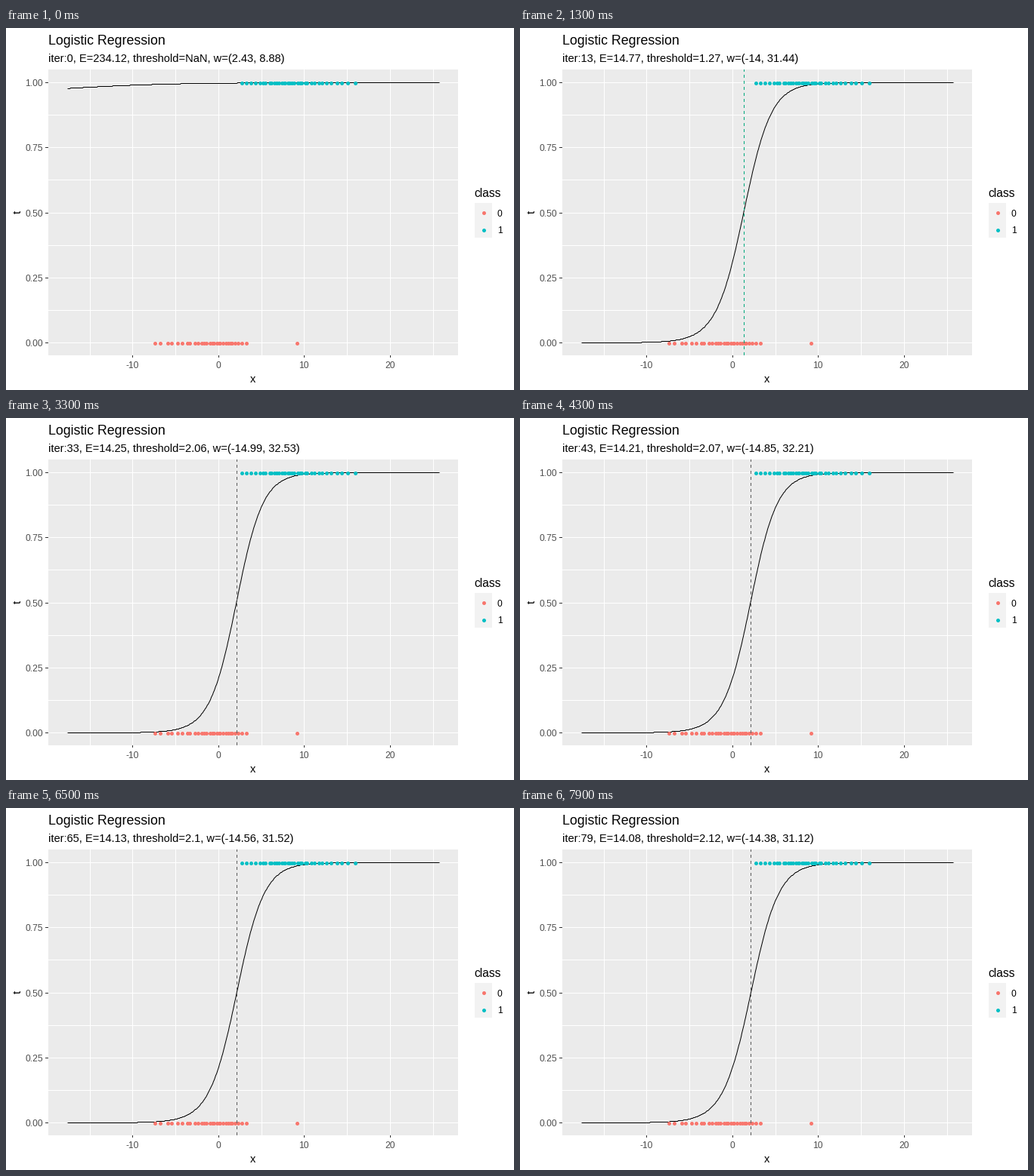
These frames come from a looping animation (672 px wide and 480 px high, 8000 ms). A matplotlib script:

```python
import numpy as np
import matplotlib.pyplot as plt
from matplotlib.animation import FuncAnimation
from matplotlib.patches import Rectangle

W, H, DPI = 672, 480, 100
FRAMES, INTERVAL = 80, 100
PX = 72 / DPI                      # points per pixel
LEFT, RIGHT, TOP, BOTTOM = 56, 598, 55, 434
MU, SCALE = 4.027, 12.57           # sigmoid basis
RED, TEAL, GREEN, GRAY = "#F8766D", "#00BFC4", "#00A87B", "#595959"

plt.rcParams["font.family"] = "Liberation Sans"
fig = plt.figure(figsize=(W / DPI, H / DPI), dpi=DPI, facecolor="white")
ax = fig.add_axes([0, 0, 1, 1])
ax.set_xlim(0, W)
ax.set_ylim(H, 0)
ax.axis("off")


def px_x(x):
    return 281.4 + 11.35 * x


def px_y(t):
    return 417.5 - 345 * t


def center(v):
    """Middle of the pixel that holds v."""
    return np.floor(v) + 0.5


def sigmoid(a):
    return 1 / (1 + np.exp(-a))


def rect(x, y, w, h, color):
    ax.add_patch(Rectangle((x, y), w, h, fc=color, lw=0))


def stroke(xs, ys, color, z, **kw):
    return ax.plot(xs, ys, color=color, lw=PX, zorder=z, snap=False,
                   solid_capstyle="butt", dash_capstyle="butt", **kw)[0]


def label(x, y, s, size, color="black", **kw):
    kw.setdefault("va", "baseline")
    return ax.text(x, y, s, fontsize=size * PX, color=color, zorder=6, **kw)


def dots(xs, y, color):
    ax.scatter(xs, np.full(len(xs), y), s=(5 * PX) ** 2, color=color,
               lw=0, zorder=4)


# Panel, grid, axes
rect(LEFT, TOP, RIGHT - LEFT, BOTTOM - TOP, "#EBEBEB")
for v in range(-15, 26, 5):
    x = center(px_x(v))
    stroke([x, x], [TOP, BOTTOM], "white", 2)
    if v % 10 == 0:
        stroke([x, x], [BOTTOM, BOTTOM + 3], "#333333", 2)
        label(x - 0.5, 451, str(v), 12, "#4D4D4D", ha="center")
for k in range(9):
    y = center(px_y(k / 8))
    stroke([LEFT, RIGHT], [y, y], "white", 2)
    if k % 2 == 0:
        stroke([LEFT - 4, LEFT], [y, y], "#333333", 2)
        label(49, y + 4.5, f"{k / 8:.2f}", 12, "#4D4D4D", ha="right")
label(326.5, 470, "x", 14.67, ha="center")
label(16, 243.5, "t", 14.67, ha="center", va="center", rotation=90)

# Legend
label(619.5, 224, "class", 15.5)
rect(620, 232, 23, 46, "#F2F2F2")
for y, name, color in ((244.5, "0", RED), (267.5, "1", TEAL)):
    dots([631.5], y, color)
    label(650, y + 5, name, 12)

# Observations: smooth quantile curves with a little seeded jitter
rng = np.random.default_rng(4)


def sample(n, *coef):
    u = np.linspace(-1, 1, n)
    return np.polyval(coef, u) + rng.uniform(-0.12, 0.12, n)


zeros = np.append(sample(28, 1.5, -1.3, 3.83, -1.0), 9.1)
ones = sample(34, 2.35, 0.8, 4.2, 8.4)
dots(center(px_x(zeros)), px_y(0), RED)
dots(center(px_x(ones)), px_y(1), TEAL)

label(56, 22, "Logistic Regression", 17.8)
subtitle = label(56, 45, "", 14.6)
cols = np.arange(81, 574) + 0.5
phi = sigmoid(((cols - px_x(0)) / 11.35 - MU) / SCALE)
curve = stroke(cols, cols, "black", 3)
vline = stroke([0, 0], [BOTTOM, TOP], GREEN, 5, linestyle=(0, (4, 4)))


def training(i):
    """Error and weights: a fast fit followed by a slow drift."""
    err = 14.37 - 0.0037 * i + 219.75 * np.exp(-0.4766 * i)
    fast = np.exp(-(i / 7.027) ** 1.5735)
    d = i - 33
    w0 = -14.994 + 0.014452 * d - 2.4e-5 * d * d + 17.927 * fast
    w1 = 32.534 - 0.033275 * d + 5.3e-5 * d * d - 24.81 * fast
    return err, w0, w1


def num(v):
    return f"{round(v, 2):g}"


def update(i):
    err, w0, w1 = training(i)
    curve.set_ydata(center(px_y(sigmoid(w0 + w1 * phi))))
    ratio = -w0 / w1
    shown, thr = False, "NaN"
    if 0 < ratio < 1:
        cut = MU + SCALE * np.log(ratio / (1 - ratio))
        thr = num(cut)
        x = round(px_x(cut))
        shown = LEFT < x < RIGHT
        vline.set_xdata([x + 0.5] * 2)
        vline.set_color(GRAY if x >= 305 else GREEN)
    vline.set_visible(shown)
    subtitle.set_text(f"iter:{i}, E={num(err)}, threshold={thr}, "
                      f"w=({num(w0)}, {num(w1)})")
    return curve, vline, subtitle


anim = FuncAnimation(fig, update, frames=FRAMES, interval=INTERVAL,
                     repeat=True, repeat_delay=0)
plt.show()
```
